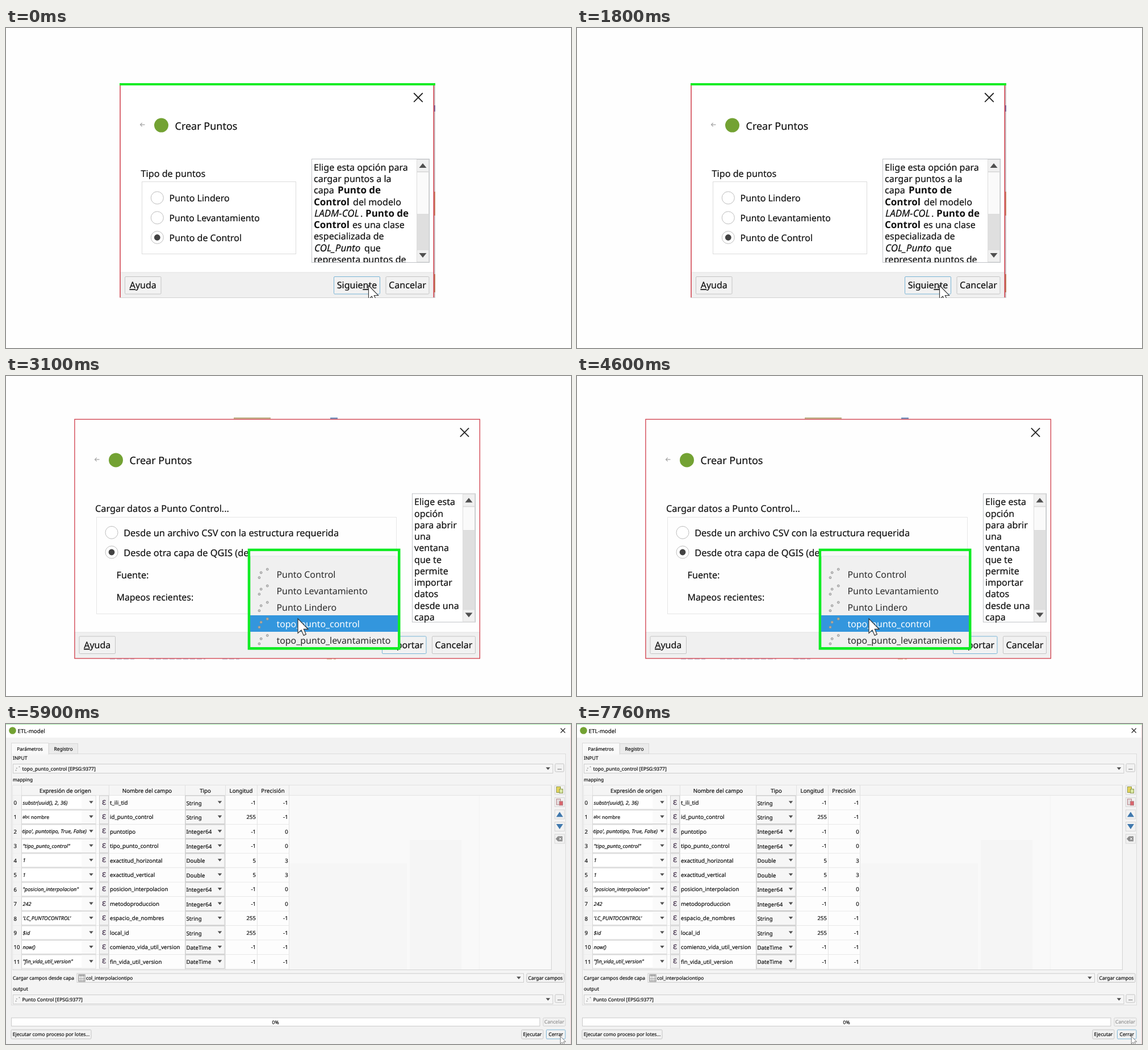
Recreate the animation shown at these times as an HTML page. Size 995 by 563 pixels, loop 9000 ms.

```html
<!DOCTYPE html>
<html lang="es">
<head>
<meta charset="utf-8">
<title>Crear Puntos</title>
<style>
html, body { margin: 0; width: 100%; height: 100%; overflow: hidden; background: #fefefe; }
svg { display: block; width: 995px; height: 563px; }
text { font-family: "Noto Sans", "Open Sans", sans-serif; text-rendering: geometricPrecision; white-space: pre; }
</style>
</head>
<body>
<svg id="stage" viewBox="0 0 995 563" xmlns="http://www.w3.org/2000/svg"></svg>
<script>
const INK = '#111', GREEN = '#10ec24', RED = '#cf3b48', LOGO = '#73a233';

const attrs = o => Object.entries(o).map(([k, v]) => ` ${k}="${v}"`).join('');
// A hairline stroke in the fill colour gives the slightly heavy screen type.
const text = (x, y, str, size = 16.2, o = {}) =>
  `<text${attrs({ x, y, 'font-size': size, fill: INK, stroke: o.fill || INK, 'stroke-width': .2, ...o })}>${str}</text>`;
// Rectangles are given by their edges: left, top, right, bottom.
const rect = (l, t, r, b, fill, o = {}) =>
  `<rect${attrs({ x: l, y: t, width: r - l, height: b - t, fill, ...o })}/>`;
const box = (l, t, r, b, fill, stroke, o = {}) =>
  rect(l + .5, t + .5, r - .5, b - .5, fill, { stroke, ...o });
const dot = (cx, cy, r, fill, o = {}) => `<circle${attrs({ cx, cy, r, fill, ...o })}/>`;
const path = (d, stroke, w = 1, o = {}) =>
  `<path${attrs({ d, stroke, 'stroke-width': w, fill: 'none', ...o })}/>`;
const fillPath = (d, fill) => `<path d="${d}" fill="${fill}"/>`;
const under = c => `<tspan text-decoration="underline">${c}</tspan>`;
const bold = { 'font-weight': 700, 'stroke-width': 0 }, italic = { 'font-style': 'italic' };
const middle = { 'text-anchor': 'middle' }, end = { 'text-anchor': 'end' };

const cross = (x, y, r, w, c = '#222') =>
  path(`M${x - r} ${y - r}L${x + r} ${y + r}M${x + r} ${y - r}L${x - r} ${y + r}`, c, w);
const tri = (x, y, w, h, fill = '#505050') =>
  fillPath(`M${x - w} ${y - h}H${x + w}L${x} ${y + h}Z`, fill);

function cursor(x, y, k) {
  return `<path transform="translate(${x} ${y}) scale(${k})" d="M0 0V17L4 13.4L6.8 19.6L9.6 18.3L6.9 12.3H12Z"
    fill="#fff" stroke="#333" stroke-width=".8"/>`;
}

function button(l, t, r, b, label, size, o = {}) {
  return box(l, t, r, b, '#f2f2f2', o.edge || '#c4c4c4', { rx: 1.5 }) +
    text((l + r) / 2, (t + b) / 2 + size * .35, label, size, { ...middle, fill: o.ink || INK });
}

function radio(x, y, label, on, size) {
  return dot(x, y, 11, '#fff', { stroke: '#bdbdbd' }) + (on ? dot(x, y, 5.4, '#434343') : '') +
    text(x + 21.2, y + 6.6, label, size);
}

function scrollbar(l, t, r, b, thumb) {
  const m = (l + r) / 2;
  return rect(l, t, r, b, '#dfdfdf') + box(l, t, r, t + 22, '#f0f0f0', '#dedede') +
    box(l, t + 22, r, thumb, '#fafafa', '#dcdcdc') + box(l, b - 22, r, b, '#f0f0f0', '#dedede') +
    tri(m, t + 11, 6.5, -4) + tri(m, b - 12, 6.5, 4);
}

function heading(x, y) {
  return path(`M${x - 53} ${y - 8.5}h-8m3.2 -3.2l-3.2 3.2l3.2 3.2`, '#a3a3a3', 1.2) +
    dot(x - 24, y - 7.5, 12.5, LOGO) + text(x, y, 'Crear Puntos', 18);
}

function typeDialog() {
  const lines = [
    [[542, 'Elige esta opción para']], [[542, 'cargar puntos a la']],
    [[542, 'capa'], [584, 'Punto de', bold]], [[542, 'Control', bold], [611, 'del modelo']],
    [[543, 'LADM-COL', italic], [624, '.'], [633, 'Punto de', bold]],
    [[542, 'Control', bold], [610, 'es una clase']], [[542, 'especializada de']],
    [[543, 'COL_Punto', italic], [631, 'que']], [[542, 'representa puntos de']]
  ];
  const help = lines.map((parts, i) => parts.map(([x, s, o]) =>
    text(x, 250.8 + 20.25 * i, s, o ? 17 : 16.1, o)).join('')).join('');
  return rect(200, 97, 756, 475, '#fff') + rect(201, 430, 754, 475, '#f0f0f0') +
    rect(201, 429.5, 754, 430.5, '#e3e3e3') + rect(203, 107, 752, 108, '#f6f6f6') +
    rect(754, 101, 756, 475, '#cfc7ca') + rect(754, 136, 756, 147, '#7d6a9c') +
    rect(754, 288, 756, 330, '#c98268') + rect(754, 433, 756, 465, '#c07a5e') +
    rect(200.3, 101, 201.8, 475, RED) + rect(752.5, 101, 754, 475, RED) +
    rect(200, 474, 756, 475, '#d3d3d3') + rect(200, 97, 756, 101, GREEN) +
    cross(726, 122.3, 7.8, 1.8) + heading(297.5, 178.6) +
    text(237.5, 262, 'Tipo de puntos') + box(239, 270, 511, 398, 'none', '#dcdcdc') +
    radio(266.3, 298.8, 'Punto Lindero', false, 16) +
    radio(266.3, 333.8, 'Punto Levantamiento', false, 15.8) +
    radio(266.3, 368.5, 'Punto de Control', true, 16) +
    box(538, 230, 746, 413, '#fff', '#bfc2c6') + `<g clip-path="url(#help)">${help}</g>` +
    scrollbar(723, 231, 745, 412, 328) +
    button(209, 437, 273.5, 468.5, under('A') + 'yuda', 16) +
    button(577, 437, 659, 468.5, 'Siguie' + under('n') + 'te', 16, { edge: '#79b4d6' }) +
    button(668.5, 437, 745.5, 468.5, 'Cancelar', 16.1) +
    `<g clip-path="url(#dialog)">${cursor(638.5, 453, 1.42)}</g>`;
}

function layerIcon(x, y, k, fill, stroke) {
  return [[0, 0], [3.2, -8.8], [14.3, -14.6]].map(([dx, dy]) =>
    dot(x + dx * k, y + dy * k, 1.9 * k, fill, { stroke, 'stroke-width': .9 * k })).join('');
}

function layerList() {
  const names = ['Punto Control', 'Punto Levantamiento', 'Punto Lindero',
    'topo_punto_control', 'topo_punto_levantamiento'];
  const items = names.map((s, i) => {
    const y = 355 + 29.1 * i, hot = i === 3;
    return (hot ? rect(430, 421, 690, 450, '#3396dd') : '') +
      layerIcon(446, y - .3, 1, hot ? '#a9b3b5' : '#cfcfcf', hot ? '#b98e66' : '#8c8c8c') +
      text(476.5, y, s, 15.9, { fill: hot ? '#fff' : '#2a2a2a', 'stroke-width': 0 });
  }).join('');
  return rect(425.7, 303.7, 694.5, 481.7, GREEN) + rect(430.3, 308.3, 690, 477, '#f0f0f0') +
    rect(430.3, 308.3, 690, 317, '#f8f8f8') + rect(430.3, 316.5, 686, 317.5, '#dde6ea') +
    items + cursor(514, 427, 1.5);
}

function sourceDialog() {
  const help = ['Elige esta', 'opción', 'para abrir', 'una', 'ventana', 'que te', 'permite',
    'importar', 'datos', 'desde una', 'capa'];
  return rect(401, 73, 466, 75.5, '#a99a62', { opacity: .8 }) + rect(571, 73.3, 584, 75.5, '#5a82b5') +
    [[183, 226], [252, 351], [381, 411], [565, 581]].map(([a, b], i) =>
      path(`M${a} 498H${b}`, i < 3 ? '#a9a3bf' : '#c6a76c', 1, { 'stroke-dasharray': '9 3' })).join('') +
    rect(121, 76, 834, 496, '#fefefe') + rect(121, 451, 834, 496, '#f0f0f0') +
    rect(121, 450.5, 834, 451.5, '#e3e3e3') +
    rect(120.9, 76.2, 834.4, 496.9, 'none', { stroke: RED, 'stroke-width': 1.3 }) +
    cross(807.5, 99.3, 7.6, 1.8) + heading(217.5, 155.4) +
    text(157, 238.6, 'Cargar datos a Punto Control...', 16.3) + box(159, 248, 688, 419, 'none', '#e6e6e6') +
    radio(186, 275.4, 'Desde un archivo CSV con la estructura requerida', false, 16.35) +
    radio(186, 310, 'Desde otra capa de QGIS (de', true, 16.4) +
    text(194.5, 356, 'Fuente:', 16.2) + text(194.5, 395, 'Mapeos recientes:', 15.9) +
    box(715, 206.5, 827, 433.5, '#fff', '#bfc2c6') +
    help.map((s, i) => text(719, 227.4 + 20.25 * i, s, 16.1)).join('') +
    scrollbar(804, 207.5, 826, 432.5, 272) +
    button(128.5, 457.5, 193, 489, under('A') + 'yuda', 16) +
    button(662, 457.5, 740.5, 489, 'Importar', 16, { edge: '#79b4d6' }) +
    button(750, 457.5, 827, 489, 'Cancelar', 16.1) + layerList();
}

const combo = (l, t, r, b) =>
  box(l, t, r, b, '#f6f6f6', '#cdcdcd') + tri(r - 9, (t + b) / 2, 3.8, 2.3);

function layerCombo(t, label) {
  return combo(12, t, 963.5, t + 17) + layerIcon(17.5, t + 11.5, .42, '#aaa', '#888') +
    text(28.5, t + 12, label, 8.55) + button(966.5, t - .5, 983, t + 14.5, '...', 8.5);
}

function fieldRow([expr, field, type, len, prec], i) {
  const t = 125.6 + 25.45 * i, y = t + 12.7, b = t + 25.45;
  let cell;
  if (i === 1) cell = text(29, y + 2, 'abc', 7.6) + text(44, y + 3.2, expr, 8.6);
  else if (i === 2) cell = `<g clip-path="url(#expr)">${text(142, y + 3.2, expr, 9.2, { ...italic, ...end })}</g>`;
  else cell = text(29.5, y + 3.2, expr, 9.2, italic);
  return rect(12, t, 27, b, '#f4f4f4') + rect(12, b - .5, 498, b + .3, '#e4e4e4') +
    text(13.5, y + 3.6, i, 9.6) +
    box(27, t, 158.5, b - .5, '#fff', '#d4d4d4') + rect(133, t + 1, 157.5, b - 1.5, '#fafafa') +
    tri(150, y - .6, 3.7, 2.3) + cell +
    box(164, t, 181, b - .5, '#f2f2f2', '#d0d0d0') + text(172.5, y + 3.2, 'ε', 15, { ...middle, fill: '#4d3b55' }) +
    text(183, y + 3.4, field, 9.7) + box(315.5, t, 385.5, b - .2, '#f6f6f6', '#c4c4c4') +
    tri(376.5, y - .6, 3.7, 2.3) + text(317.5, y + 4.2, type, 9.7) +
    text(440, y + 3.4, len, 9.6, end) + text(496.7, y + 3.4, prec, 9.6, end);
}

function toolIcons() {
  const page = (y, fill, edge, mark) => box(969, y - 6, 977, y + 5, fill, edge) +
    box(974, y - 2, 981, y + 6, mark, edge);
  return [116, 137.5, 159, 180.5, 202].map(y => box(966, y - 8.5, 984, y + 8.5, '#f2f2f2', '#d6d6d6')).join('') +
    page(116, '#e6d45c', '#8e9b4e', '#d9e7a5') + page(137.5, '#e5dfe0', '#b58388', '#d9646c') +
    tri(975, 159, 6, -4.5, '#3f78ad') + tri(975, 180.5, 6, 4.5, '#3f78ad') +
    fillPath('M968 202l4 -4.5h8v9h-8Z', '#8d8d8d') + cross(976, 202, 2, 1, '#fff');
}

function mappingWindow() {
  const rows = [
    ['substr(uuid(), 2, 36)', 't_ili_tid', 'String', -1, -1],
    ['nombre', 'id_punto_control', 'String', 255, -1],
    ["'puntotipo', puntotipo, True, False)", 'puntotipo', 'Integer64', -1, 0],
    ['"tipo_punto_control"', 'tipo_punto_control', 'Integer64', -1, 0],
    ['1', 'exactitud_horizontal', 'Double', 5, 3],
    ['1', 'exactitud_vertical', 'Double', 5, 3],
    ['"posicion_interpolacion"', 'posicion_interpolacion', 'Integer64', -1, 0],
    ['242', 'metodoproduccion', 'Integer64', -1, 0],
    ["'LC_PUNTOCONTROL'", 'espacio_de_nombres', 'String', 255, -1],
    ['$id', 'local_id', 'String', 255, -1],
    ['now()', 'comienzo_vida_util_version', 'DateTime', -1, -1],
    ['"fin_vida_util_version"', 'fin_vida_util_version', 'DateTime', -1, -1]
  ];
  const heads = [[104.5, 'Expresión de origen'], [248.5, 'Nombre del campo'], [351, 'Tipo'],
    [414, 'Longitud'], [470, 'Precisión']];
  const shade = rect(499, 126, 960, 432, '#f9f9f9') + rect(499, 245, 706, 432, '#f6f6f6') +
    rect(711, 204, 802, 432, '#f5f5f5') + rect(833, 126, 834, 432, '#f4f4f4');
  return rect(0, 0, 995, 563, '#f2f2f2') + rect(0, 0, 995, 24, '#fff') +
    rect(0, 0, 995, 1, '#a5eaa8') + rect(994, 1, 995, 563, '#f0d3d6') +
    dot(11.5, 11.5, 6.3, LOGO) + text(20.5, 15.6, 'ETL-model', 9.8) + cross(980.7, 11.5, 4, 1.1) +
    box(9, 52, 986, 495, '#f4f4f4', '#dcdcdc') + box(75, 34, 127, 53, '#ebebeb', '#d6d6d6') +
    box(9, 33, 75.5, 54, '#f9f9f9', '#d9d9d9') + rect(10, 52, 74.5, 55, '#f6f6f6') +
    text(42, 46.8, 'Parámetros', 8.4, middle) + text(101, 47, 'Registro', 8.5, middle) +
    text(12, 63.4, 'INPUT', 8.5) + layerCombo(70, 'topo_punto_control [EPSG:9377]') +
    text(12, 101.2, 'mapping', 8.3) + box(11.5, 107.5, 961, 433, '#fdfdfd', '#d2d2d2') + shade +
    rect(12, 108, 960, 125.5, '#f5f5f5') + rect(12, 125, 960, 125.8, '#dfdfdf') +
    [27, 181, 315, 386, 442, 498].map(x => rect(x, 108, x + .8, 432, '#dedede')).join('') +
    heads.map(([x, s]) => text(x, 121, s, 9.7, middle)).join('') + rows.map(fieldRow).join('') +
    toolIcons() + text(12, 450.3, 'Cargar campos desde capa', 8.5) +
    combo(124.5, 438.5, 912, 455) + box(127.5, 440.5, 139.5, 453.5, '#fff', '#777') +
    rect(128, 441, 139, 444, '#b5b5b5') + path('M128 447.5H139M128 450.5H139M132 441V453M136 441V453', '#8b8b8b', .8) +
    text(141, 450.3, 'col_interpolaciontipo', 8.4) +
    button(916.5, 438.5, 983.5, 455, 'Cargar campos', 8.55) +
    text(12, 469.2, 'output', 8.45) + layerCombo(476, 'Punto Control [EPSG:9377]') +
    box(9, 516.5, 940.5, 532, '#fff', '#cbcbcb') + text(474.5, 527.6, '0%', 8.6, middle) +
    button(945.5, 516.5, 985.5, 532, 'Cancelar', 8.55, { ink: '#929292', edge: '#d2d2d2' }) +
    button(8.5, 537.5, 150.5, 554.5, 'Ejecutar como proceso por lotes...', 8.5) +
    button(907.5, 537.5, 946.5, 554.5, 'Ejecutar', 8.6) +
    button(951, 537.5, 985.5, 554.5, 'Cerrar', 8.6, { edge: '#79b4d6' }) + cursor(976.3, 549.5, .78);
}

const clip = (id, ...edges) => `<clipPath id="${id}">${rect(...edges, '#000')}</clipPath>`;
const stage = document.getElementById('stage');
stage.innerHTML = `<defs>${clip('help', 539, 231, 723, 412)}${clip('dialog', 200, 97, 756, 475)}` +
  `${clip('expr', 28, 170, 143, 210)}</defs>` +
  [typeDialog, sourceDialog, mappingWindow].map(f => `<g class="scene">${f()}</g>`).join('');

const scenes = [...stage.querySelectorAll('.scene')];
const LOOP = 9000, starts = [0, 3000, 5600];

function draw(ms) {
  const t = ms % LOOP;
  const now = starts.filter(s => s <= t).length - 1;
  scenes.forEach((g, i) => g.setAttribute('display', i === now ? 'inline' : 'none'));
}

const t0 = performance.now();
function tick() {
  draw(performance.now() - t0);
  requestAnimationFrame(tick);
}
tick();
</script>
</body>
</html>
```
